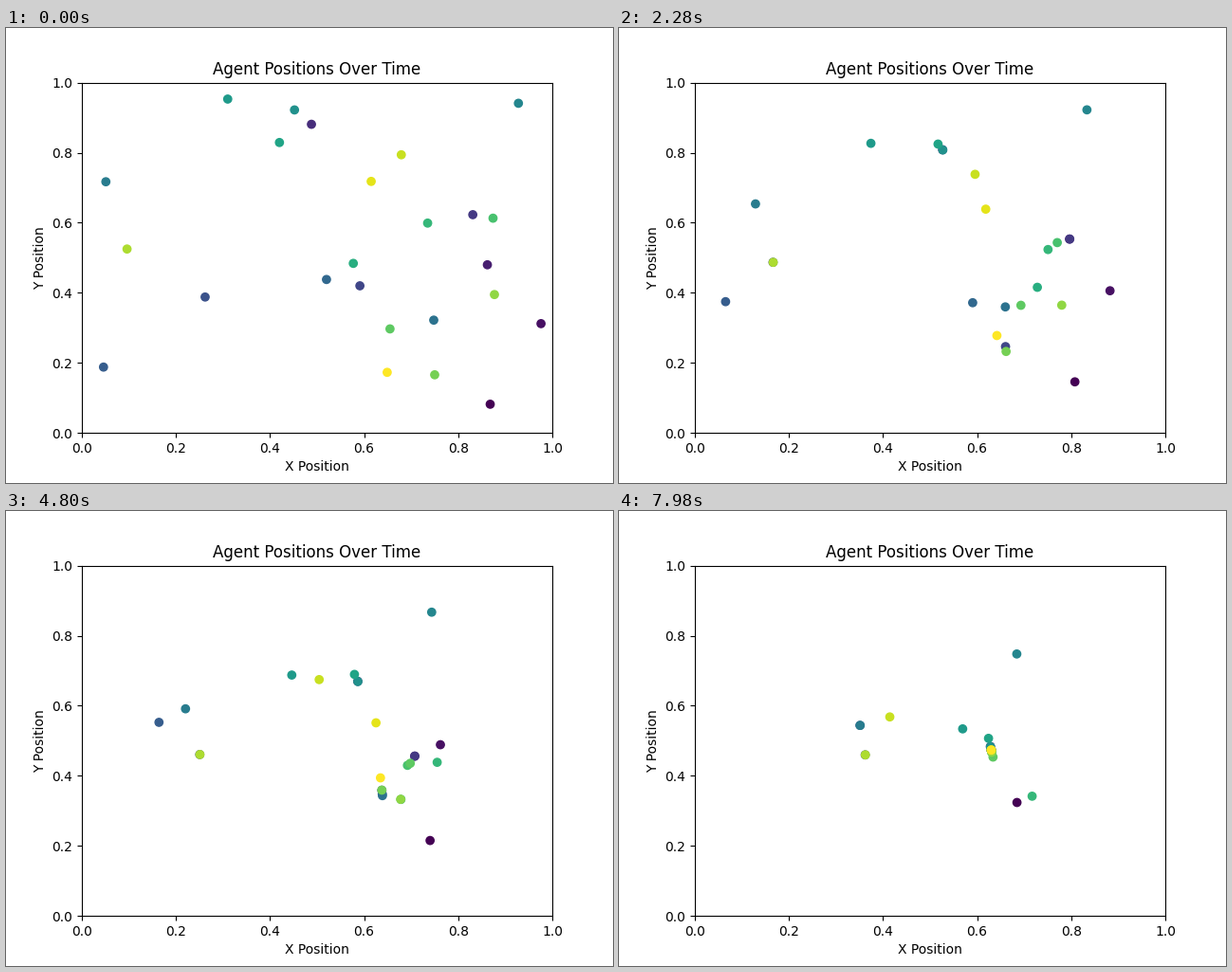
Recreate the animation shown at these times as a matplotlib script. Size 640 by 480 pixels, loop 8 s.

```python
import matplotlib.pyplot as plt
import numpy as np
from matplotlib.animation import FuncAnimation

STEPS = 134       # states, each held for 60 ms
SUBSTEPS = 6      # smooths the pursuit, so a catcher sticks to its prey
FRAMES = 200
INTERVAL = 40


def agent(x, y, prey, pace=4.95):
    """Start point, index of the agent it chases, thousandths moved per step."""
    return x, y, prey, pace


AGENTS = [
    agent(.868, .082, 8, 2.31),
    agent(.976, .312, 23, 3.49),
    agent(.862, .480, 17, 3.2),
    agent(.488, .881, 12),
    agent(.831, .623, 2),
    agent(.591, .420, 19),
    agent(.262, .388, 21, 6.5),
    agent(.046, .188, 10),
    agent(.520, .438, 5, 2.61),
    agent(.748, .322, 8, 2.53),
    agent(.051, .717, 19, 2.64),
    agent(.928, .941, 14, 2.54),
    agent(.452, .922, 23, 3.6),
    agent(.310, .953, 19, 3.73),
    agent(.420, .829, 3, 3.55),
    agent(.577, .484, 20, 4.4),
    agent(.735, .599, 0, 2.03),
    agent(.874, .613, 8, 3.3),
    agent(.655, .297, 17, 2.04),
    agent(.750, .166, 24, 3.08),
    agent(.877, .395, 5, 2.77),
    agent(.096, .525, 24, 2.11),
    agent(.679, .794, 6, 2.65),
    agent(.615, .718, 5, 2.09),
    agent(.649, .173, 23, 2.77),
]


def chase():
    """Positions of all agents at every step, shape (STEPS, n, 2)."""
    x, y, prey, pace = np.array(AGENTS).T
    pos = np.column_stack([x, y])
    prey = prey.astype(int)
    reach = pace / 1000 / SUBSTEPS
    path = [pos]
    for _ in range(STEPS - 1):
        for _ in range(SUBSTEPS):
            gap = pos[prey] - pos
            dist = np.hypot(*gap.T)
            share = np.minimum(1, reach / np.maximum(dist, 1e-12))
            pos = pos + gap * share[:, None]
        path.append(pos)
    return path


path = chase()

fig, ax = plt.subplots(figsize=(6.4, 4.8), dpi=100)
ax.set(xlim=(0, 1), ylim=(0, 1), xlabel="X Position", ylabel="Y Position",
       title="Agent Positions Over Time")
dots = ax.scatter(*path[0].T, c=range(len(AGENTS)), cmap="viridis")


def update(i):
    dots.set_offsets(path[(2 * i + 1) // 3])
    return (dots,)


anim = FuncAnimation(fig, update, frames=FRAMES, interval=INTERVAL,
                     init_func=lambda: update(0), repeat=True, repeat_delay=0)
plt.show()
```
